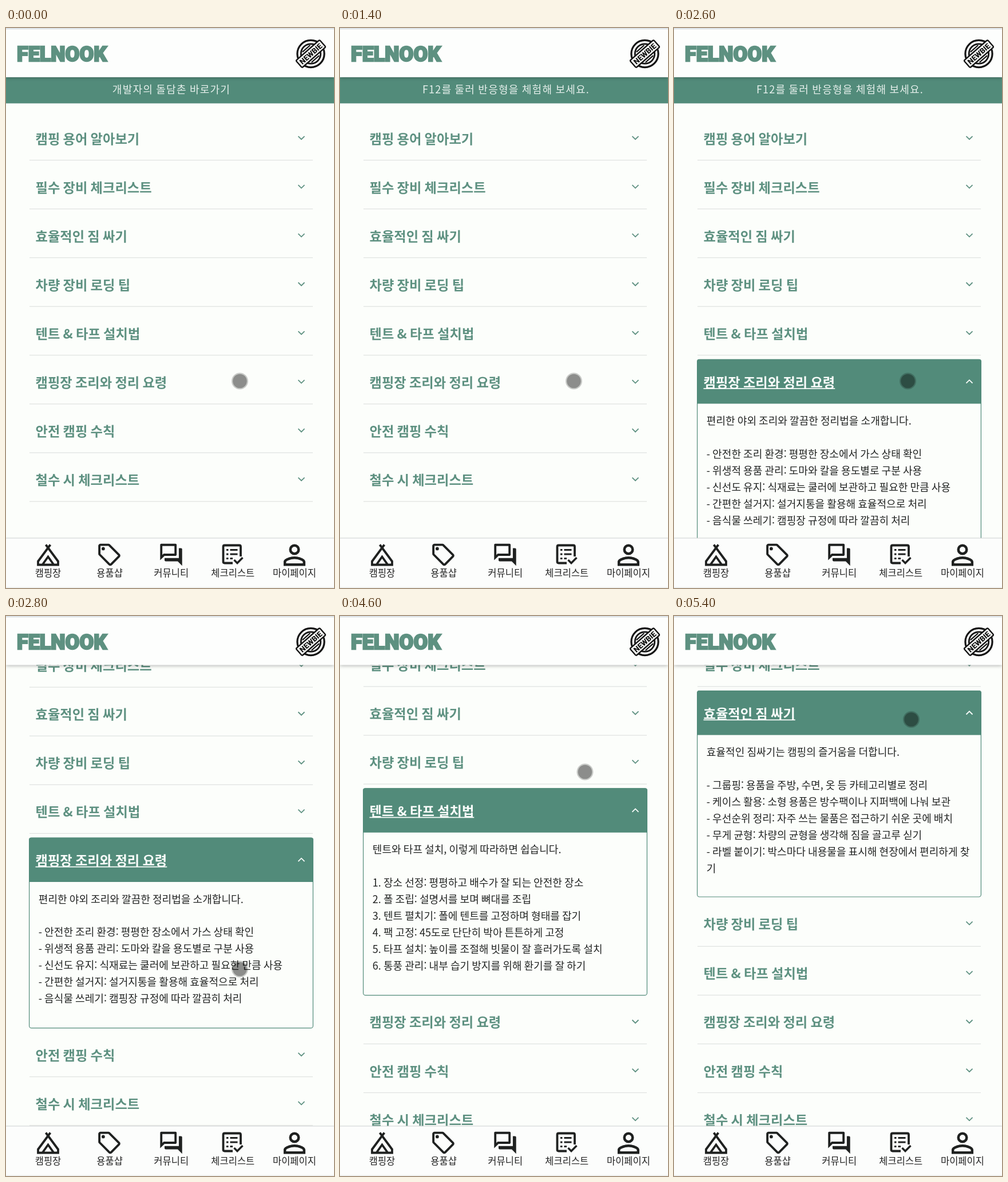
These frames come from a looping animation (573x977 px, 5500 ms). An HTML page with a canvas:

```html
<!DOCTYPE html>
<html lang="ko">
<head>
<meta charset="utf-8">
<title>캠핑 가이드</title>
<style>
html, body { margin: 0; width: 100%; height: 100%; overflow: hidden; background: #fcfefb; }
canvas { display: block; width: 573px; height: 977px; }
</style>
</head>
<body>
<canvas id="stage" width="573" height="977"></canvas>
<script>
const ctx = document.getElementById('stage').getContext('2d');
const W = 573, H = 977, LOOP = 5500;
const FONT = '"Noto Sans CJK KR", "Noto Sans CJK", "Noto Sans KR", sans-serif';
const PAGE = '#fcfefb', GREEN = [82, 139, 122], TITLE = [94, 145, 129], INK = '#1f2120';
const LIST_TOP = 145.5, ROW = 85.07, GAP = 7, HEAD = 77.6, LINE = 28.9, SCROLL = 192.6;

// open / close: start times of each panel's transitions
const items = [
  { title: '캠핑 용어 알아보기' },
  { title: '필수 장비 체크리스트' },
  { title: '효율적인 짐 싸기', open: 5130, lines: [
    '효율적인 짐싸기는 캠핑의 즐거움을 더합니다.', '',
    '- 그룹핑: 용품을 주방, 수면, 옷 등 카테고리별로 정리',
    '- 케이스 활용: 소형 용품은 방수팩이나 지퍼백에 나눠 보관',
    '- 우선순위 정리: 자주 쓰는 물품은 접근하기 쉬운 곳에 배치',
    '- 무게 균형: 차량의 균형을 생각해 짐을 골고루 싣기',
    '- 라벨 붙이기: 박스마다 내용물을 표시해 현장에서 편리하게 찾', '기'] },
  { title: '차량 장비 로딩 팁', open: 4660, close: 5130, lines: [
    '차량에 장비를 안전하게 싣는 방법입니다.', '',
    '1. 무거운 장비: 바닥 쪽에 먼저 싣기',
    '2. 가벼운 장비: 위쪽에 차곡차곡 쌓기',
    '3. 자주 쓰는 용품: 꺼내기 쉬운 곳에 배치',
    '4. 빈 공간 활용: 침낭과 옷으로 틈 채우기',
    '5. 시야 확보: 뒷유리를 가리지 않게 정리',
    '6. 고정 확인: 출발 전에 짐을 단단히 고정'] },
  { title: '텐트 & 타프 설치법', open: 3950, close: 4660, lines: [
    '텐트와 타프 설치, 이렇게 따라하면 쉽습니다.', '',
    '1. 장소 선정: 평평하고 배수가 잘 되는 안전한 장소',
    '2. 폴 조립: 설명서를 보며 뼈대를 조립',
    '3. 텐트 펼치기: 폴에 텐트를 고정하며 형태를 잡기',
    '4. 팩 고정: 45도로 단단히 박아 튼튼하게 고정',
    '5. 타프 설치: 높이를 조절해 빗물이 잘 흘러가도록 설치',
    '6. 통풍 관리: 내부 습기 방지를 위해 환기를 잘 하기'] },
  { title: '캠핑장 조리와 정리 요령', open: 2250, close: 3950, lines: [
    '편리한 야외 조리와 깔끔한 정리법을 소개합니다.', '',
    '- 안전한 조리 환경: 평평한 장소에서 가스 상태 확인',
    '- 위생적 용품 관리: 도마와 칼을 용도별로 구분 사용',
    '- 신선도 유지: 식재료는 쿨러에 보관하고 필요한 만큼 사용',
    '- 간편한 설거지: 설거지통을 활용해 효율적으로 처리',
    '- 음식물 쓰레기: 캠핑장 규정에 따라 깔끔히 처리'] },
  { title: '안전 캠핑 수칙' },
  { title: '철수 시 체크리스트' }
];

const moves = [
  { from: 3300, to: 3780, x: 393, y: 344 },
  { from: 4330, to: 4570, x: 428, y: 272 },
  { from: 4920, to: 5090, x: 414.5, y: 180.5 }
];

const clamp = v => Math.min(1, Math.max(0, v));
const span = (t, from, to) => clamp((t - from) / (to - from));
const smooth = p => p * p * (3 - 2 * p);
const rgb = c => `rgb(${c.map(Math.round).join()})`;
const mix = (a, b, p) => a.map((v, i) => v + (b[i] - v) * p);

// cubic-bezier(.4, 0, .2, 1)
function standard(x) {
  let lo = 0, hi = 1, s = x;
  for (let i = 0; i < 18; i++) {
    s = (lo + hi) / 2;
    const v = 1.2 * s * (1 - s) * (1 - s) + 0.6 * s * s * (1 - s) + s * s * s;
    if (v < x) lo = s; else hi = s;
  }
  return s * s * (3 - 2 * s);
}

function text(str, x, mid, size, color, weight = 400, align = 'left') {
  ctx.font = `${weight} ${size}px ${FONT}`;
  ctx.textAlign = align;
  ctx.fillStyle = color;
  ctx.fillText(str, x, mid + size * 0.37);
}

function rect(x, y, w, h, color) {
  ctx.fillStyle = color;
  ctx.fillRect(x, y, w, h);
}

function rounded(x, y, w, h, r) {
  ctx.beginPath();
  ctx.roundRect(x, y, w, h, r);
}

function stroke(d, width, color = INK) {
  ctx.lineWidth = width;
  ctx.strokeStyle = color;
  ctx.stroke(new Path2D(d));
}

function progress(item, t, time) {
  if (!item.open) return 0;
  if (item.close && t >= item.close) return 1 - standard(span(t, item.close, item.close + time));
  return standard(span(t, item.open, item.open + time));
}

function chevron(y, turn, color) {
  ctx.save();
  ctx.translate(516, y);
  ctx.rotate(Math.PI * turn);
  stroke('M-5.5 -2.7L0 2.7L5.5 -2.7', 1.8, color);
  ctx.restore();
}

function drawItem(item, top, t) {
  const p = progress(item, t, 300), tint = progress(item, t, 150);
  const panel = item.lines ? (LINE * item.lines.length + 52) * p : 0;
  const y = top + GAP, bottom = top + ROW + panel;
  if (tint > 0 || p > 0) {
    ctx.save();
    rounded(40, y, 497, bottom - y + 0.6, 4);
    ctx.clip();
    ctx.globalAlpha = tint;
    rect(40, y, 497, HEAD, rgb(GREEN));
    ctx.globalAlpha = 1;
    ctx.beginPath();
    ctx.rect(40, y + HEAD, 497, panel);
    ctx.clip();
    item.lines.forEach((s, i) => text(s, 56.8, y + HEAD + 30 + i * LINE, 18.08, '#222423'));
    ctx.restore();
    ctx.globalAlpha = tint;
    ctx.lineWidth = 1.2;
    ctx.strokeStyle = rgb(GREEN);
    rounded(40.6, y + 0.6, 495.8, bottom - y - 0.4, 4);
    ctx.stroke();
    ctx.globalAlpha = 1;
  }
  if (tint < 1) {
    ctx.globalAlpha = 1 - tint;
    rect(41, bottom - 0.6, 495, 1.2, '#dfe2e0');
    ctx.globalAlpha = 1;
  }
  const color = rgb(mix(TITLE, [250, 253, 251], tint));
  text(item.title, 51.5, y + 40.4, 23.25, color, 700);
  if (tint > 0.5) rect(51.5, y + 50.4, ctx.measureText(item.title).width, 1.7, color);
  chevron(y + 39, tint, color);
  return bottom;
}

function drawBanner(t, scroll) {
  const y = 86 - scroll;
  if (y < 30) return;
  rect(0, y, W, 45.5, rgb(GREEN));
  const shift = W * smooth(span(t, 150, 450));
  ctx.letterSpacing = '1.17px';
  text('개발자의 돌담촌 바로가기', 289 - shift, y + 21.5, 18.08, '#e6f0ec', 500, 'center');
  text('F12를 둘러 반응형을 체험해 보세요.', 290 + W - shift, y + 21.5, 18.08, '#e6f0ec', 500, 'center');
  ctx.letterSpacing = '0px';
}

function drawBadge() {
  ctx.save();
  ctx.translate(532.5, 45);
  ctx.strokeStyle = ctx.fillStyle = '#141414';
  for (const [r, w] of [[23.6, 3.2], [17.2, 2.8]]) {
    ctx.lineWidth = w;
    ctx.beginPath();
    ctx.arc(0, 0, r, 0, 7);
    ctx.stroke();
  }
  ctx.rotate(-0.72);
  stroke('M-9 -12H9M-9 12H9', 2.2, '#141414');
  rounded(-27.5, -8.2, 55, 16.4, 2);
  ctx.fillStyle = PAGE;
  ctx.fill();
  ctx.lineWidth = 2.4;
  ctx.stroke();
  ctx.font = '900 13px Roboto, sans-serif';
  ctx.textAlign = 'center';
  ctx.fillStyle = '#141414';
  ctx.fillText('NEWBIE', 0, 4.7);
  ctx.restore();
}

function drawHeader() {
  ctx.save();
  ctx.shadowColor = 'rgba(0,0,0,.28)';
  ctx.shadowBlur = 6;
  ctx.shadowOffsetY = 1.5;
  rect(0, 0, W, 85.5, '#fdfefd');
  ctx.restore();
  rect(0, 0, W, 2.5, '#dfe5ea');
  ctx.font = '900 36px Roboto, sans-serif';
  ctx.textAlign = 'left';
  ctx.fillStyle = rgb(TITLE);
  ctx.fillText('FELNOOK', 19, 58);
  ctx.lineWidth = 2.4;
  ctx.strokeStyle = rgb(TITLE);
  ctx.strokeText('FELNOOK', 19, 58);
  drawBadge();
}

const tag = 'M21.41 11.41l-8.83-8.83c-.37-.37-.88-.58-1.41-.58H4c-1.1 0-2 .9-2 2v7.17c0 .53.21 1.04.59 1.41l8.83 8.83c.78.78 2.05.78 2.83 0l7.17-7.17c.78-.78.78-2.04-.01-2.83zM12.83 20L4 11.17V4h7.17L20 12.83zM8 6.5a1.5 1.5 0 1 0-3 0a1.5 1.5 0 1 0 3 0z';
const chat = 'M15 4v7H5.17L4 12.17V4zM16 2H3c-.55 0-1 .45-1 1v14l4-4h10c.55 0 1-.45 1-1V3c0-.55-.45-1-1-1zM21 6h-2v9H6v2c0 .55.45 1 1 1h11l4 4V7c0-.55-.45-1-1-1z';
const person = 'M12 5.9a2.1 2.1 0 1 1 0 4.2a2.1 2.1 0 1 1 0-4.2zM12 14.9c2.97 0 6.1 1.46 6.1 2.1v1.1H5.9V17c0-.64 3.13-2.1 6.1-2.1zM12 4a4 4 0 1 0 0 8a4 4 0 1 0 0-8zM12 13c-2.67 0-8 1.34-8 4v3h16v-3c0-2.66-5.33-4-8-4z';

function icon(d, x, y, scale) {
  ctx.save();
  ctx.translate(x - 12 * scale, y - 12 * scale);
  ctx.scale(scale, scale);
  ctx.fillStyle = INK;
  ctx.fill(new Path2D(d), 'evenodd');
  ctx.restore();
}

function drawNav() {
  ctx.save();
  ctx.shadowColor = 'rgba(0,0,0,.12)';
  ctx.shadowBlur = 3;
  rect(0, 890, W, H - 890, '#fcfdfc');
  ctx.restore();
  rect(0, 889.5, W, 1.2, '#dcdfdf');
  rect(0, 975.5, W, 1.5, '#eef0ef');
  stroke('M69.5 901.5L91 930.5V936.5H56V930.5L77.5 901.5M63.5 936.5L73.5 922.5L83.5 936.5', 3.8);
  icon(tag, 180.5, 919, 1.93);
  icon(chat, 288.5, 919, 1.92);
  stroke('M396 933.5H382Q379.5 933.5 379.5 931V905Q379.5 902.5 382 902.5H407.5Q410 902.5 410 905V922', 3.8);
  stroke('M385 910.5H388.5M385 918H388.5M385 925.5H388.5M391.5 910.5H404.5M391.5 918H404.5M391.5 925.5H396', 3.2);
  stroke('M398.5 928L404 933.5L413.5 924', 3.4);
  icon(person, 504, 919.5, 2.38);
  ['캠핑장', '용품샵', '커뮤니티', '체크리스트', '마이페이지'].forEach((s, i) =>
    text(s, 73.5 + i * 107.6, 950.5, 16.5, '#222', 400, 'center'));
}

function drawPointer(t) {
  let x = 408.5, y = 616;
  for (const m of moves) {
    const p = smooth(span(t, m.from, m.to));
    x += (m.x - x) * p;
    y += (m.y - y) * p;
  }
  for (const [r, a] of [[14.5, 0.2], [12.3, 0.3]]) {
    ctx.beginPath();
    ctx.arc(x, y, r, 0, 7);
    ctx.fillStyle = `rgba(0,0,0,${a})`;
    ctx.fill();
  }
}

function draw(t) {
  rect(0, 0, W, H, PAGE);
  const scroll = SCROLL * (1 - Math.pow(1 - span(t, 2625, 2840), 3));
  drawBanner(t, scroll);
  let y = LIST_TOP - scroll;
  for (const item of items) y = drawItem(item, y, t);
  drawHeader();
  drawNav();
  drawPointer(t);
}

const start = performance.now();
function tick() {
  draw((performance.now() - start) % LOOP);
  requestAnimationFrame(tick);
}
tick();
</script>
</body>
</html>
```
